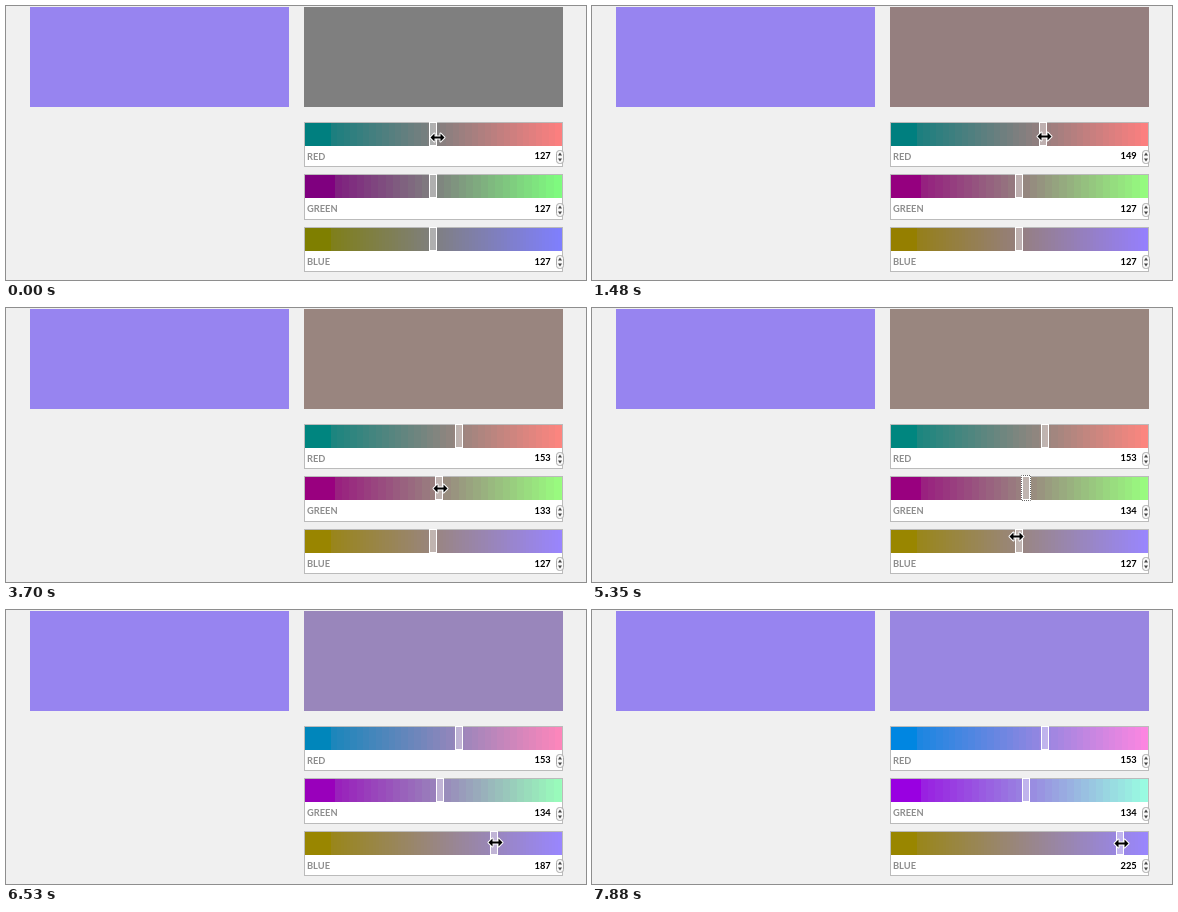
Write an HTML page with a canvas that moves like this. It is 580 px wide and 274 px high and loops after 8 s.

```html
<!DOCTYPE html>
<html lang="en">
<head>
<meta charset="utf-8">
<title>Colour sliders</title>
<style>
  html, body { margin: 0; width: 100%; height: 100%; overflow: hidden; background: #f0f0f0; }
  canvas { display: block; }
</style>
</head>
<body>
<canvas id="stage" width="580" height="274"></canvas>
<script>
const LOOP = 8000, TICK = 148.6, LEAD = 15;
const PITCH = 52.5;
const ctx = document.getElementById('stage').getContext('2d');

// keys: [tick, thumb centre, value]; the first and last key bound the drag
const sliders = [
  { label: 'RED', band: 6.4,
    keys: [[3, 427, 127], [7, 450, 147], [9, 450, 147], [12, 453, 152], [15, 453, 153]] },
  { label: 'GREEN', band: 7.3,
    keys: [[21, 427, 127], [25, 433, 133], [32, 434, 134]] },
  { label: 'BLUE', band: 3.2,
    keys: [[38, 427, 127], [44, 488, 187], [46, 494, 193], [53, 528, 225]] }
].map((slider, i) => ({ ...slider, index: i, top: Math.floor(116 + PITCH * i) }));

// [tick, x, y]; while a thumb is dragged, x follows the thumb
const pointerKeys = [
  [0, 431, 131], [2, 428, 131], [10, 452, 130], [16, 454, 130], [18, 429, 166],
  [20, 427, 180], [33, 435, 180], [36, 424, 228], [38, 427, 231], [53, 528, 233]
];

const rgb = c => `rgb(${c.map(Math.round).join()})`;

function interpolate(keys, n) {
  const next = keys.findIndex(key => key[0] > n);
  if (next === 0) return keys[0].slice(1);
  if (next < 0) return keys.at(-1).slice(1);
  const [from, to] = [keys[next - 1], keys[next]];
  const u = (n - from[0]) / (to[0] - from[0]);
  return from.slice(1).map((v, i) => Math.round(v + (to[i + 1] - v) * u));
}

const grabbed = (slider, n) => n > slider.keys[0][0];
const released = (slider, n) => n > slider.keys.at(-1)[0];
const over = (slider, y) => y >= slider.top && y < slider.top + 24;

function pointerAt(n) {
  const [x, y] = interpolate(pointerKeys, n);
  const held = sliders.find(s => grabbed(s, n) && !released(s, n));
  return { x: held ? interpolate(held.keys, n)[0] + 1 : x, y };
}

// A released slider keeps its focus ring until the next one is grabbed
function isFocused(slider, n, pointer) {
  const next = sliders[slider.index + 1];
  return released(slider, n) && !over(slider, pointer.y) && next && !grabbed(next, n);
}

function rect(x, y, w, h, fill) {
  ctx.fillStyle = fill;
  ctx.fillRect(x, y, w, h);
}

function frame(x, y, w, h, stroke) {
  ctx.strokeStyle = stroke;
  ctx.lineWidth = 1;
  ctx.strokeRect(x + 0.5, y + 0.5, w - 1, h - 1);
}

function text(str, x, y, align, fill) {
  ctx.font = '700 9.3px Lato, sans-serif';
  ctx.textAlign = align;
  ctx.fillStyle = fill;
  ctx.fillText(str, x, y);
}

function polygon(points) {
  ctx.beginPath();
  points.forEach(([x, y]) => ctx.lineTo(x, y));
  ctx.closePath();
}

// Each track varies one channel; its darkest tenth is flat
function drawTrack({ band, top, index }, color) {
  const width = 257;
  for (let x = 0; x < width; x++) {
    const u = Math.min(1, (Math.floor(x / band) + 0.5) * band / width);
    const shade = [...color];
    shade[index] = u < 0.1 ? 0 : 255 * u;
    rect(299 + x, top + 1, 1, 23, rgb(shade));
  }
}

function drawSpinner(y) {
  ctx.beginPath();
  ctx.roundRect(550.5, y - 6.5, 7, 13, 3);
  ctx.fillStyle = '#f8f8f8';
  ctx.fill();
  ctx.strokeStyle = '#aaa';
  ctx.lineWidth = 1;
  ctx.stroke();
  ctx.fillStyle = '#444';
  for (const side of [-1, 1]) {
    polygon([[552, y + side * 1.5], [556, y + side * 1.5], [554, y + side * 4.5]]);
    ctx.fill();
  }
}

function drawThumb(x, top, focused) {
  rect(x - 4, top, 8, 24, 'rgba(255,255,255,.38)');
  frame(x - 4, top, 8, 24, '#fff');
  if (!focused) return;
  frame(x - 5, top - 1, 10, 26, '#fff');
  ctx.setLineDash([1, 1]);
  ctx.lineDashOffset = 0.5;
  frame(x - 5, top - 1, 10, 26, '#666');
  ctx.setLineDash([]);
}

function drawSlider(slider, color, n, pointer) {
  const { top, index } = slider;
  const height = Math.round(161 + PITCH * index) - top;
  const [x, value] = interpolate(slider.keys, n);
  rect(298, top, 259, height, '#fff');
  drawTrack(slider, color);
  frame(298, top, 259, height, '#bbb');
  drawThumb(x, top, isFocused(slider, n, pointer));
  text(slider.label, 301, top + 38, 'left', '#8e8e8e');
  text(value, 544.7, 153 + 53 * index, 'right', '#000');
  drawSpinner(Math.ceil(151 + PITCH * index));
}

const arrowShape = [[0, 0], [0, 13.5], [3.1, 10.8], [5.3, 16], [7.7, 15], [5.5, 10], [9.6, 9.6]];
const resizeHalf = [[-7, 0], [-3, -4], [-3, -1.1], [3, -1.1], [3, -4], [7, 0]];
const resizeShape = [...resizeHalf, ...resizeHalf.slice(1, -1).map(([x, y]) => [-x, -y])];

function drawPointer({ x, y }) {
  const onTrack = sliders.some(slider => over(slider, y));
  ctx.save();
  ctx.translate(x + 0.5, y + 0.5);
  polygon(onTrack ? resizeShape : arrowShape);
  ctx.lineJoin = 'round';
  ctx.lineWidth = 2;
  ctx.strokeStyle = '#fff';
  ctx.stroke();
  ctx.fillStyle = '#000';
  ctx.fill();
  ctx.restore();
}

function draw(t) {
  const n = Math.floor((t + LEAD) / TICK);
  const color = sliders.map(slider => interpolate(slider.keys, n)[1]);
  const pointer = pointerAt(n);
  rect(0, 0, 580, 274, '#f0f0f0');
  rect(24, 1, 259, 100, '#9784f0');
  rect(298, 1, 259, 100, rgb(color));
  sliders.forEach(slider => drawSlider(slider, color, n, pointer));
  drawPointer(pointer);
}

const start = performance.now();
function tick() {
  draw((performance.now() - start) % LOOP);
  requestAnimationFrame(tick);
}
tick();
</script>
</body>
</html>
```
